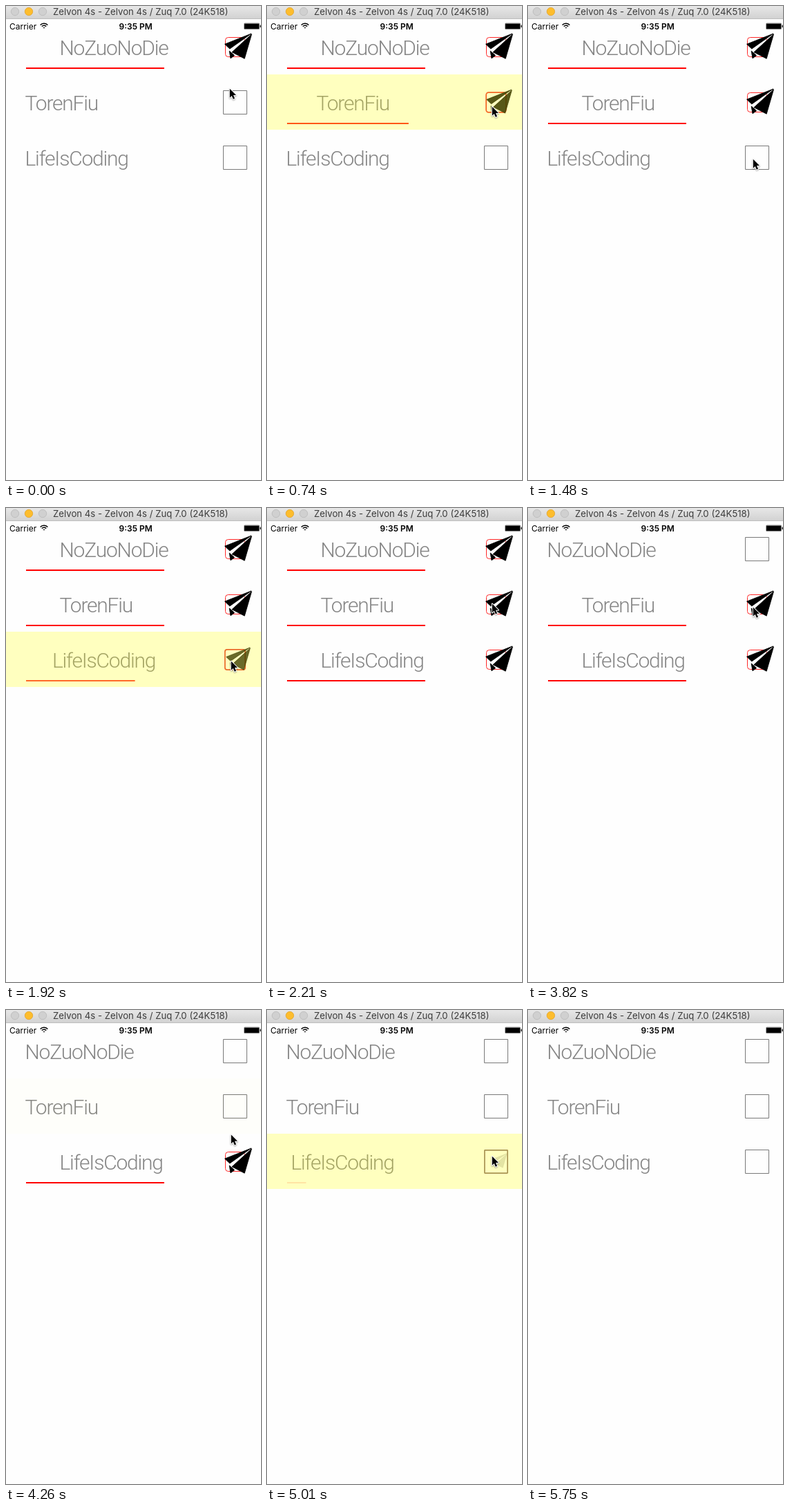
Write an HTML page with a canvas that moves like this. It is 369 px wide and 686 px high and loops after 6720 ms.

```html
<!DOCTYPE html>
<html lang="en">
<head>
<meta charset="utf-8">
<title>Check list</title>
<style>
  html, body { margin: 0; width: 100%; height: 100%; overflow: hidden; background: #fefefe; }
  canvas { display: block; width: 369px; height: 686px; }
</style>
</head>
<body>
<canvas id="stage"></canvas>
<script>
const W = 369, H = 686, LOOP = 6720, STEP = 147, ROW = 80, TOP = 19;
const REACH = 300, REST = 270; // pointer arrives before a tap, leaves after it
const canvas = document.getElementById('stage');
const ctx = canvas.getContext('2d');
const dpr = window.devicePixelRatio || 1;
canvas.width = W * dpr;
canvas.height = H * dpr;

const rows = [
  { label: 'NoZuoNoDie', on: true },
  { label: 'TorenFiu', on: false },
  { label: 'LifeIsCoding', on: false }
];

const taps = [
  { at: 500, row: 1, y: 145 },
  { at: 1700, row: 2, y: 221 },
  { at: 2817, row: 0, y: 64 },
  { at: 3833, row: 1, y: 143 },
  { at: 4768, row: 2, y: 211 }
];
const EXIT = { x: 334, y: 598, at: 5590 };

// Wing, body and fold
const plane = new Path2D(
  'M355 40 L316.6 55.2 L323.8 62 Z M355.5 40.8 L345.2 76.2 L327 66.8 Z M323.2 65 L330.6 71.6 L325 75.8 Z');
const arrow = new Path2D('M0 0 V13 L2.9 10.2 L5 15 L7.2 14 L5.2 9.3 H9.2 Z');

const clamp = v => Math.max(0, Math.min(1, v));
const ease = v => v * v * (3 - 2 * v);
const mix = (a, b, u) => a + (b - a) * u;

function disc(x, y, fill, edge) {
  ctx.beginPath();
  ctx.arc(x, y, 5.7, 0, Math.PI * 2);
  ctx.fillStyle = fill;
  ctx.fill();
  ctx.lineWidth = 0.8;
  ctx.strokeStyle = edge;
  ctx.stroke();
}

function text(str, x, y, font, color, align = 'left', spacing = 0) {
  ctx.font = font;
  ctx.fillStyle = color;
  ctx.textAlign = align;
  ctx.letterSpacing = spacing + 'px';
  ctx.fillText(str, x, y);
}

function rowState(i, t) {
  let u = rows[i].on ? 1 : 0, glow = 0;
  for (const tap of taps) {
    const age = t - tap.at;
    if (tap.row !== i || age < 0) continue;
    const p = ease(clamp(age / 300));
    u = u > 0.5 ? 1 - p : p;
    glow = clamp(age / 120) * clamp((440 - age) / 150);
  }
  return { u, glow };
}

function drawBox(u) {
  const inset = mix(0.5, 3.5, u), size = 35 - inset * 2;
  ctx.lineWidth = 1 + Math.min(0.7, 8 * u * (1 - u));
  ctx.strokeStyle = `rgb(${mix(122, 255, u)},${mix(122, 40, u)},${mix(122, 40, u)})`;
  ctx.beginPath();
  ctx.roundRect(314 + inset, 42 + inset, size, size, 4 * u);
  ctx.stroke();
}

function drawPlane(u) {
  const s = 0.5 + 0.5 * u;
  ctx.save();
  ctx.globalAlpha = u;
  ctx.translate(336, 58);
  ctx.scale(s, s);
  ctx.translate(-336, -58);
  ctx.fillStyle = ctx.strokeStyle = '#000';
  ctx.lineWidth = 0.9;
  ctx.lineJoin = 'round';
  ctx.fill(plane);
  ctx.stroke(plane);
  ctx.restore();
}

function drawRow(row, i, t) {
  const { u, glow } = rowState(i, t);
  ctx.save();
  ctx.translate(0, i * ROW);
  text(row.label, 27.5 + 50 * u, 71, '300 30px Roboto, sans-serif', '#858585', 'left', -1.2);
  if (u > 0) {
    ctx.globalAlpha = u;
    ctx.fillStyle = '#f00';
    ctx.fillRect(29, 89, 200 * u, 2);
    ctx.globalAlpha = 1;
  }
  drawBox(u);
  if (u > 0) drawPlane(u);
  if (glow > 0) {
    ctx.fillStyle = `rgba(255,255,0,${0.25 * glow})`;
    ctx.fillRect(0, TOP, W, ROW);
  }
  ctx.restore();
}

function drawTitleBar() {
  const g = ctx.createLinearGradient(0, 0, 0, TOP);
  g.addColorStop(0, '#e7e7e7');
  g.addColorStop(1, '#d1d1d1');
  ctx.fillStyle = g;
  ctx.fillRect(0, 0, W, TOP);
  ctx.fillStyle = '#bdbdbd';
  ctx.fillRect(0, TOP - 1, W, 1);
  disc(13, 8, '#d0d0d0', '#b9b9b9');
  disc(33, 8, '#fdbd2d', '#e2a32a');
  disc(53, 8, '#d0d0d0', '#b9b9b9');
  text('Zelvon 4s - Zelvon 4s / Zuq 7.0 (24K518)', 68, 13,
    '400 13.2px Inter, sans-serif', '#3c3c3c');
}

function drawStatus() {
  text('Carrier', 5, 33.5, '400 12px Inter, sans-serif', '#000');
  text('9:35 PM', 187.7, 33.5, '600 12px Inter, sans-serif', '#000', 'center');

  ctx.strokeStyle = ctx.fillStyle = '#000';
  ctx.lineWidth = 1.5;
  for (const r of [1.2, 4.4, 7.4]) {
    ctx.beginPath();
    ctx.arc(55, 32.6, r, -Math.PI * 0.76, -Math.PI * 0.24);
    ctx.stroke();
  }

  ctx.lineWidth = 0.7;
  ctx.strokeStyle = '#777';
  ctx.beginPath();
  ctx.roundRect(344.4, 24.9, 22.4, 8.8, 1.5);
  ctx.stroke();
  ctx.fillRect(345, 25.5, 21.2, 7.6);
  ctx.fillRect(367.5, 27.6, 1.2, 3.4);
}

function pointerAt(t) {
  let from = { x: 323, y: 119, leave: 0 };
  for (const { at, y } of [...taps, { at: EXIT.at + REACH, y: EXIT.y }]) {
    const arrive = at - REACH, x = y === EXIT.y ? EXIT.x : 325;
    if (t < arrive) {
      const u = clamp((t - from.leave) / (arrive - from.leave)) ** 0.75;
      return [mix(from.x, x, u), mix(from.y, y, u)];
    }
    from = { x, y, leave: at + REST };
  }
  return null;
}

function drawPointer(t) {
  const pos = pointerAt(t);
  if (!pos) return;
  ctx.save();
  ctx.translate(pos[0] + 0.8, pos[1] + 0.8);
  ctx.lineJoin = 'round';
  ctx.shadowColor = 'rgba(0,0,0,.35)';
  ctx.shadowBlur = 2 * dpr;
  ctx.shadowOffsetY = dpr;
  ctx.lineWidth = 2;
  ctx.strokeStyle = '#fff';
  ctx.stroke(arrow);
  ctx.shadowColor = 'transparent';
  ctx.fillStyle = '#000';
  ctx.fill(arrow);
  ctx.restore();
}

function draw(time) {
  // The picture advances in coarse steps.
  const t = Math.floor((time % LOOP + 5) / STEP) * STEP;
  ctx.setTransform(dpr, 0, 0, dpr, 0, 0);
  ctx.fillStyle = '#fefefe';
  ctx.fillRect(0, 0, W, H);
  rows.forEach((row, i) => drawRow(row, i, t));
  drawTitleBar();
  drawStatus();
  drawPointer(t);
}

const start = performance.now();
function tick() {
  draw(performance.now() - start);
  requestAnimationFrame(tick);
}
tick();
</script>
</body>
</html>
```
